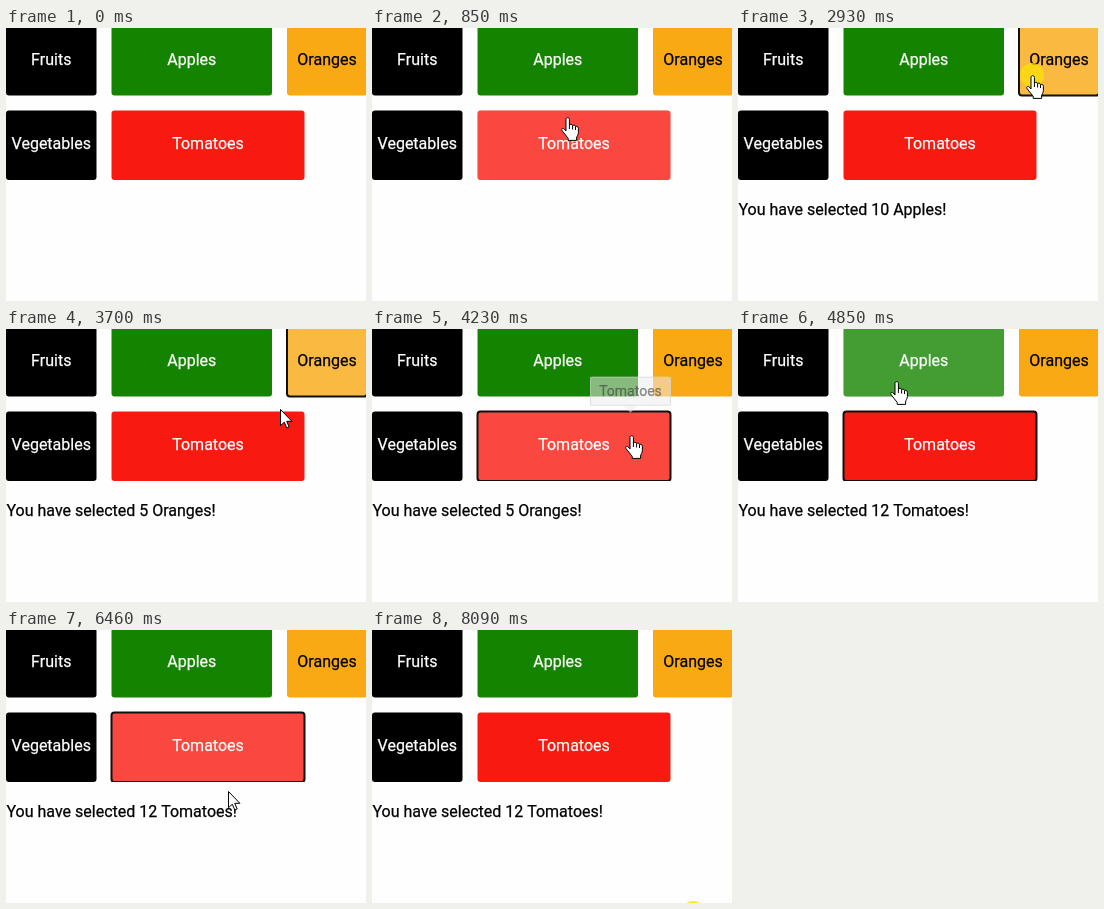
An HTML page with a canvas for the animation above (8170 ms loop, 360 px wide and 273 px high).

```html
<!DOCTYPE html>
<html lang="en">
<head>
<meta charset="utf-8">
<title>Selectable cells</title>
<style>
  html, body { margin: 0; width: 100%; height: 100%; overflow: hidden; background: #fefefe; }
  canvas { display: block; width: 360px; height: 273px; }
</style>
</head>
<body>
<canvas id="stage" width="360" height="273"></canvas>
<script>
const LOOP = 8170, STEP = 77.3, POINTER_SHOWN = 440;
const GLOW_TIME = 149, REPLY_DELAY = 375, TIP_DELAY = 240, TIP_LINGER = 210, TIP_FADE = 110;
const ctx = document.getElementById('stage').getContext('2d', { alpha: false });

// Two rows of cells; every cell has the same height
const HEIGHT = 69.5;
const cell = (label, row, x, w, fill, ink = '#fff') => ({ label, x, y: row * 84.5 - 2, w, fill, ink });
const apples = cell('Apples', 0, 105.5, 160.5, '#148400');
const oranges = cell('Oranges', 0, 281, 80, '#f9a913', '#000');
const tomatoes = cell('Tomatoes', 1, 105.5, 193, '#f81a11');
const choices = [apples, oranges, tomatoes];
const cells = [cell('Fruits', 0, 0, 90.5, '#000'), cell('Vegetables', 1, 0, 90.5, '#000'), ...choices];

// The pointer's visits: when it sets off, arrives and clicks
const start = { x: 216, y: 229 };
const visits = [
  { leave: 300, arrive: 1135, click: 1610, x: 185, y: 26, cell: apples, amount: 10 },
  { leave: 1830, arrive: 2610, click: 2930, x: 294, y: 47, cell: oranges, amount: 5 },
  { leave: 3400, arrive: 3930, click: 3930, x: 259, y: 106, cell: tomatoes, amount: 12 },
  { leave: 4310, arrive: 4910, click: 5120, x: 155, y: 50, cell: apples, amount: 10 },
  { leave: 5470, arrive: 6050, click: 6080, x: 199, y: 129, cell: tomatoes, amount: 12 },
  { leave: 6230, arrive: 7000, x: 297, y: 267 },
  { leave: 7000, arrive: 8000, click: 8020, x: 321, y: 283 }
];

const clamp = v => Math.max(0, Math.min(1, v));
const mix = (a, b, u) => a + (b - a) * u;
const smooth = u => u * u * (3 - 2 * u);
const snap = t => POINTER_SHOWN + STEP * Math.floor((t - POINTER_SHOWN) / 77);
const lastClick = t => visits.findLast(v => v.click <= t);

function pointer(t) {
  return visits.reduce((from, v) => {
    const u = smooth(clamp((t - v.leave) / (v.arrive - v.leave)));
    return { x: mix(from.x, v.x, u), y: mix(from.y, v.y, u) };
  }, start);
}

const cellAt = ({ x, y }) =>
  choices.find(c => x >= c.x && x < c.x + c.w && y >= c.y && y < c.y + HEIGHT);

function text(string, x, y, color, size = 16, align = 'center') {
  ctx.font = `${size}px Roboto, sans-serif`;
  ctx.textAlign = align;
  ctx.fillStyle = ctx.strokeStyle = color;
  ctx.lineWidth = .25;
  ctx.fillText(string, x, y);
  ctx.strokeText(string, x, y);
}

function drawCell(c, hovered, focused) {
  ctx.save();
  ctx.beginPath();
  ctx.rect(0, 0, 360, 152);
  ctx.clip();
  ctx.beginPath();
  ctx.roundRect(c.x, c.y, c.w, HEIGHT, 3);
  ctx.fillStyle = c.fill;
  ctx.fill();
  if (hovered) {
    ctx.fillStyle = 'rgba(255,255,255,.2)';
    ctx.fill();
  }
  if (focused) {
    ctx.strokeStyle = '#101010';
    ctx.lineWidth = 2;
    ctx.stroke();
  }
  ctx.restore();
  text(c.label, c.x + c.w / 2, Math.floor(c.y + 39), c.ink);
}

// Sits above its cell and rises while it fades in
function drawTooltip(label, x, bottom, opacity) {
  ctx.save();
  ctx.globalAlpha = opacity;
  ctx.translate(x, bottom + 6 - 12 * opacity);
  ctx.font = '14px Roboto, sans-serif';
  const w = Math.round(ctx.measureText(label).width) + 18;
  ctx.beginPath();
  ctx.roundRect(-w / 2, -36, w, 29, 3);
  ctx.moveTo(-7, -7);
  ctx.lineTo(7, -7);
  ctx.lineTo(0, 0);
  ctx.fillStyle = '#eee';
  ctx.fill();
  ctx.strokeStyle = '#ccc';
  ctx.lineWidth = 1;
  ctx.strokeRect(.5 - w / 2, -35.5, w - 1, 28);
  text(label, 0, -17, '#333', 14);
  ctx.restore();
}

const hand = new Path2D('M5 14V2.4C5 .1 8.4 .1 8.4 2.4V8C9 6.8 11.4 7 11.6 8.8C12.2 7.7 14.3 8 14.5 9.7' +
  'C15.2 8.8 17.4 9.2 17.4 11.3V15.5C17.4 18 15.6 19.3 15.6 21V23.4H7.2V21.4L1.2 13.8C-.2 11.8 2 10.6 3.2 11.9Z' +
  'M8.4 8V12M11.6 9V12.5M14.5 10V13');
const arrow = new Path2D('M.5 .5V16.7L4.3 13.2L6.8 19L9.2 18L6.7 12.3H11.9Z');

function drawPointer({ x, y }, overCell) {
  const shape = overCell ? hand : arrow;
  ctx.save();
  ctx.translate(Math.round(x) - (overCell ? 6 : 0), Math.round(y));
  ctx.fillStyle = '#fff';
  ctx.strokeStyle = '#000';
  ctx.lineWidth = 1;
  ctx.lineJoin = 'round';
  ctx.fill(shape);
  ctx.stroke(shape);
  ctx.restore();
}

function draw(t) {
  const time = snap(t), visible = t >= POINTER_SHOWN;
  const spot = pointer(time);
  const hovered = visible && cellAt(pointer(time - 80)); // highlight trails the pointer
  const clicked = lastClick(t);
  ctx.fillStyle = '#fefefe';
  ctx.fillRect(0, 0, 360, 273);
  for (const c of cells) drawCell(c, c === hovered, c === clicked?.cell);

  const reply = visits.findLast(v => v.cell && v.click + REPLY_DELAY <= t);
  if (reply) text(`You have selected ${reply.amount} ${reply.cell.label}!`, .5, 187, '#000', 16, 'left');

  visits.forEach((v, i) => {
    if (!v.cell) return;
    const shown = time - v.arrive - TIP_DELAY;
    const left = visits[i + 1].leave + TIP_LINGER - time;
    const opacity = clamp(Math.min(shown, left) / TIP_FADE);
    if (opacity) drawTooltip(v.cell.label, Math.round(spot.x) - .5, Math.round(v.cell.y + 1), opacity);
  });

  if (clicked && t < clicked.click + GLOW_TIME) {
    ctx.beginPath();
    ctx.arc(spot.x, spot.y, 12, 0, 2 * Math.PI);
    ctx.fillStyle = 'rgba(250,222,10,.8)';
    ctx.fill();
  }
  if (visible) drawPointer(spot, cellAt(spot));
}

const begin = performance.now();
function tick() {
  draw((performance.now() - begin) % LOOP);
  requestAnimationFrame(tick);
}
tick();
</script>
</body>
</html>
```
